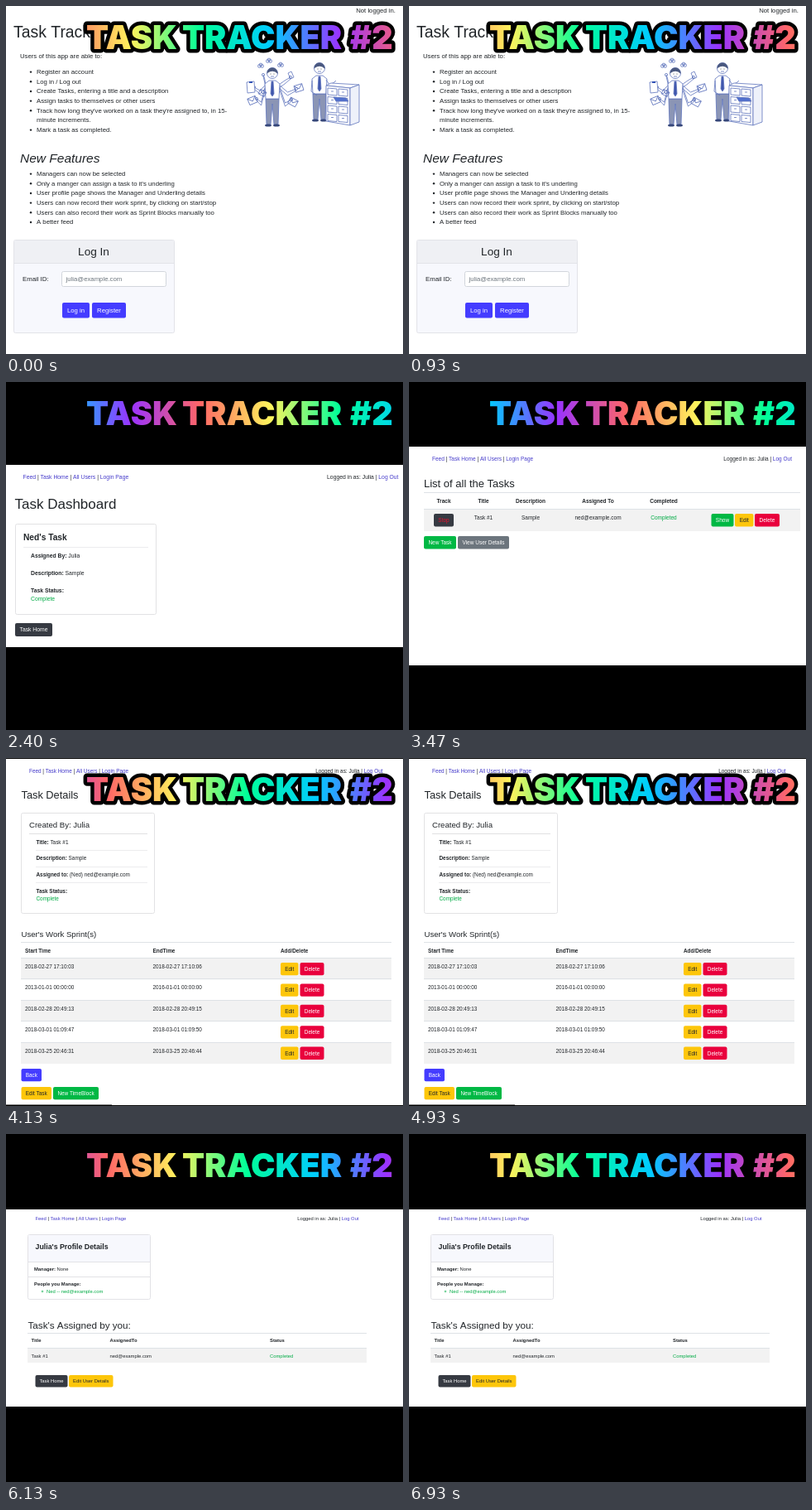
These frames come from a looping animation (480 by 420 pixels, 6990 ms). An HTML page with a canvas:

```html
<!DOCTYPE html>
<html lang="en">
<head>
<meta charset="utf-8">
<title>Task Tracker</title>
<style>
html, body { margin: 0; width: 100%; height: 100%; overflow: hidden; background: #000; }
canvas { display: block; width: 480px; height: 420px; }
</style>
</head>
<body>
<canvas id="stage" width="480" height="420"></canvas>
<script>
const g = document.getElementById('stage').getContext('2d');
const LOOP = 6990, FRAMES = 105, PER_PAGE = 15;
const SANS = '"Liberation Sans", Arial, sans-serif';
const INK = '#212529', LINK = '#463ccb', GREEN = '#00ab45', GREY = '#dee2e6';
const FILL = { blue: '#443cff', dark: '#363a42', green: '#00b844', yellow: '#fdc60a', red: '#e9003d', grey: '#6c757d' };
const USER = 'Julia', MATE = 'Ned', USER_MAIL = 'julia@example.com', MATE_MAIL = 'ned@example.com';

let size = 7.75; // body text size of the current page

function text(str, x, y, o = {}) {
  g.font = `${o.style || ''} ${o.size || size}px ${SANS}`;
  g.textAlign = o.align || 'left';
  g.fillStyle = o.color || INK;
  g.fillText(str, x, y);
  return x + g.measureText(str).width;
}
const bold = (str, x, y, o = {}) => text(str, x, y, { ...o, style: 'bold' });
const field = (label, value, x, y) => text(' ' + value, bold(label, x, y), y);

function rect(x, y, x2, y2, color) {
  g.fillStyle = color;
  g.fillRect(x, y, x2 - x, y2 - y);
}
const rule = (x, x2, y, color = GREY) => rect(x, y, x2, y + 1, color);

function box(x, y, x2, y2, fill, border, r = 2) {
  g.beginPath();
  g.roundRect(x, y, x2 - x, y2 - y, r);
  g.fillStyle = fill;
  g.fill();
  if (border) {
    g.strokeStyle = border;
    g.lineWidth = 1;
    g.stroke();
  }
}

function button(label, x, x2, y, h, kind, color) {
  box(x, y, x2, y + h, FILL[kind]);
  text(label, (x + x2) / 2, y + h / 2 + size * 0.36,
    { align: 'center', color: color || (kind === 'yellow' ? INK : '#fff') });
}

function dot(x, y, r, fill) {
  g.beginPath();
  g.arc(x, y, r, 0, 7);
  if (fill) { g.fillStyle = fill; g.fill(); } else g.stroke();
}

function runs(parts, x, y) {
  parts.forEach(([s, c]) => { x = text(s, x, y, { color: c }); });
}

function nav(left, right, y) {
  const links = ['Feed', 'Task Home', 'All Users', 'Login Page'];
  runs(links.flatMap((s, i) => i ? [[' | ', INK], [s, LINK]] : [[s, LINK]]), left, y);
  const who = `Logged in as: ${USER} | `, out = 'Log Out';
  g.font = `${size}px ${SANS}`;
  runs([[who, INK], [out, LINK]], right - g.measureText(who + out).width, y);
}

function sheet(top, bottom, textSize) {
  rect(0, top, 480, bottom, '#fff');
  size = textSize;
}

function line(pts, fill) {
  g.beginPath();
  pts.forEach(([x, y], i) => i ? g.lineTo(x, y) : g.moveTo(x, y));
  if (fill) { g.closePath(); g.fillStyle = fill; g.fill(); }
  g.stroke();
}

function worker(x, y) {
  // x, y: centre of the head
  line([[x - 8, y + 31], [x + 8, y + 31], [x + 7, y + 62], [x + 2, y + 62], [x, y + 37], [x - 2, y + 62], [x - 7, y + 62]], '#8b95b5');
  line([[x - 4, y + 9], [x + 4, y + 9], [x + 9, y + 13], [x + 8, y + 31], [x - 8, y + 31], [x - 9, y + 13]], '#fff');
  line([[x - 1, y + 10], [x + 1, y + 10], [x + 2, y + 25], [x, y + 28], [x - 2, y + 25]], '#4057ad');
  for (const s of [-5, 5]) {
    g.beginPath();
    g.ellipse(x + s, y + 63, 4, 1.6, 0, 0, 7);
    g.fillStyle = '#354679';
    g.fill();
  }
  dot(x, y, 6.5, '#fff');
  dot(x, y, 6.5);
  g.beginPath();
  g.arc(x, y, 6.5, 3, 6.4);
  g.quadraticCurveTo(x + 1, y - 5, x - 6, y);
  g.fillStyle = '#49587f';
  g.fill();
  dot(x - 2, y + 1, 0.5, INK);
  dot(x + 2, y + 1, 0.5, INK);
  line([[x - 2, y + 4], [x + 2, y + 4]]);
}

function letter(x, y, w, h, tilt) {
  g.save();
  g.translate(x, y);
  g.rotate(tilt);
  line([[-w, -h], [w, -h], [w, h], [-w, h], [-w, -h], [0, h / 4], [w, -h]]);
  g.restore();
}

function drawing() {
  g.strokeStyle = '#6075bd';
  g.lineWidth = 0.8;
  for (const [x, y] of [[318, 66], [308, 72], [332, 71]])
    for (const [dx, dy] of [[-1.6, 0.5], [1.6, 0.5], [0, -1]]) dot(x + dx, y + dy, 1.9);
  const hands = [[300, 98], [344, 86], [351, 100], [345, 113], [303, 112], [311, 83]];
  hands.forEach(([x, y]) => {
    const s = x < 322 ? -1 : 1;
    line([[322 + s * 8, 95], [(x + 322) / 2 + s * 4, y + 4], [x, y]]);
    line([[322 + s * 8, 99], [(x + 322) / 2 + s * 4, y + 8], [x, y + 2]]);
    dot(x, y, 1.6);
  });
  worker(322, 81);
  rect(291, 93, 301, 104, '#fff');
  line([[291, 92], [300, 91], [301, 104], [292, 105], [291, 92]]);
  rect(294, 91, 298, 93, '#3151b5');
  letter(354, 99, 5, 4, -0.3);
  letter(347, 116, 5, 4, 0.5);
  letter(298, 114, 5, 4, -0.4);
  letter(310, 105, 4, 3, 0.5);
  line([[341, 81], [345, 79], [348, 86], [344, 88], [341, 81]]);
  worker(379, 75);
  line([[387, 89], [391, 95], [397, 92], [399, 90]]);
  line([[370, 90], [369, 103], [376, 108]]);
  line([[387, 96], [393, 93], [427, 95], [416, 99], [387, 96]], '#fff');
  line([[387, 96], [416, 99], [416, 144], [387, 139]], '#fff');
  line([[416, 99], [427, 95], [427, 140], [416, 144]], '#eef1fa');
  for (let r = 0; r < 4; r++)
    for (let c = 0; c < 2; c++) {
      const x = 389 + c * 13, y = 99 + r * 10.5 + c;
      line([[x, y], [x + 11, y + 1], [x + 11, y + 9], [x, y + 8], [x, y]]);
      line([[x + 4, y + 4], [x + 7, y + 4]]);
    }
  line([[396, 110], [411, 111], [414, 115], [399, 115]], '#5271ce');
}

function bullets(items, y) {
  items.forEach((s, i) => {
    const base = y + i * 11.67;
    if (s[0] !== '~') dot(30, base - 2.4, 1.2, INK);
    text(s.replace('~', ''), 37, base);
  });
}

function login() {
  sheet(0, 420, 7.75);
  text('Not logged in.', 471, 8.3, { align: 'right' });
  text('Task Tracker', 9, 38, { size: 19.4 });
  text('Users of this app are able to:', 17, 62.6);
  bullets(['Register an account', 'Log in / Log out',
    'Create Tasks, entering a title and a description',
    'Assign tasks to themselves or other users',
    "Track how long they've worked on a task they're assigned to, in 15-",
    '~minute increments.', 'Mark a task as completed.'], 82);
  text('New Features', 17, 189, { size: 15.5, style: 'italic' });
  bullets(['Managers can now be selected',
    "Only a manger can assign a task to it's underling",
    'User profile page shows the Manager and Underling details',
    'Users can now record their work sprint, by clicking on start/stop',
    'Users can also record their work as Sprint Blocks manually too',
    'A better feed'], 205);
  drawing();
  box(9.5, 282.5, 203.5, 394.5, '#f7f8fd', '#e2e3e8');
  rect(10, 283, 203, 310, '#eff0f4');
  rule(10, 203, 310, '#e2e3e8');
  text('Log In', 106, 301, { size: 13.6, align: 'center' });
  text('Email ID:', 20, 332);
  box(67.5, 320.5, 193.5, 338.5, '#fff', '#d2d6dc');
  text(USER_MAIL, 72.5, 332, { color: '#6c757d' });
  button('Log in', 68, 101, 358, 18.5, 'blue');
  button('Register', 104, 145, 358, 18.5, 'blue');
}

function dashboard() {
  sheet(100, 320, 6.8);
  nav(20.5, 474.5, 117);
  text('Task Dashboard', 10.5, 153, { size: 17 });
  box(11.5, 171.5, 181.5, 280.5, '#fff', '#e2e2e4');
  bold(MATE + "'s Task", 21, 191, { size: 10.2 });
  rule(21, 172, 199, '#ececee');
  field('Assigned By:', USER, 30, 212);
  field('Description:', 'Sample', 30, 233);
  bold('Task Status:', 30, 254);
  text('Complete', 30, 263.5, { color: GREEN });
  button('Task Home', 11, 56, 291, 16, 'dark');
}

function taskList() {
  sheet(78, 342, 6.5);
  nav(28, 463, 95);
  text('List of all the Tasks', 18, 126.5, { size: 13 });
  rule(18, 473, 133);
  rect(18, 153, 473, 180, '#f2f2f2');
  rule(18, 473, 153);
  const cols = [42, 90, 147, 228.5, 308];
  ['Track', 'Title', 'Description', 'Assigned To', 'Completed'].forEach((s, i) =>
    bold(s, cols[i], 145.5, { align: 'center' }));
  ['', 'Task #1', 'Sample', MATE_MAIL, 'Completed'].forEach((s, i) =>
    text(s, cols[i], 166, { align: 'center', color: i === 4 ? GREEN : INK }));
  button('Stop', 30, 54, 159, 15.5, 'dark', '#e5122f');
  button('Show', 365.5, 392.5, 159, 15.5, 'green');
  button('Edit', 394, 416.5, 159, 15.5, 'yellow');
  button('Delete', 418, 448, 159, 15.5, 'red');
  button('New Task', 18, 57, 186, 15.5, 'green');
  button('View User Details', 59, 121, 186, 15.5, 'grey');
}

function details() {
  sheet(1, 419, 6.4);
  nav(28, 455.5, 18);
  text('Task Details', 18.5, 49, { size: 12.8 });
  box(18.5, 66.5, 179.5, 187.5, '#fff', '#e2e2e4');
  text('Created By: ' + USER, 28, 84, { size: 9.6 });
  rule(28, 171, 91, '#e0e0e2');
  [111, 131, 150].forEach(y => rule(36, 171, y, '#ececee'));
  field('Title:', 'Task #1', 36.5, 103.5);
  field('Description:', 'Sample', 36.5, 123);
  field('Assigned to:', `(${MATE}) ${MATE_MAIL}`, 36.5, 143);
  bold('Task Status:', 36.5, 162.7);
  text('Complete', 36.5, 172, { color: GREEN });
  text("User's Work Sprint(s)", 18.5, 216, { size: 9.6 });
  rule(18, 466, 222);
  bold('Start Time', 23, 234.5);
  bold('EndTime', 177.5, 234.5);
  bold('Add/Delete', 332, 234.5);
  [['2018-02-27 17:10:03', '2018-02-27 17:10:06'],
   ['2013-01-01 00:00:00', '2016-01-01 00:00:00'],
   ['2018-02-28 20:49:13', '2018-02-28 20:49:15'],
   ['2018-03-01 01:09:47', '2018-03-01 01:09:50'],
   ['2018-03-25 20:46:31', '2018-03-25 20:46:44']].forEach(([from, to], i) => {
    const y = 242 + i * 25.4;
    if (i % 2 === 0) rect(18, y, 466, y + 25.4, '#f2f2f2');
    rule(18, 466, Math.round(y) - 1);
    text(from, 23, y + 12);
    text(to, 177.5, y + 12);
    button('Edit', 332, 353.5, y + 5, 15.3, 'yellow');
    button('Delete', 355.5, 384.5, y + 5, 15.3, 'red');
  });
  button('Back', 18.5, 43, 375, 15.3, 'blue');
  button('Edit Task', 18.5, 55, 397, 15.3, 'yellow');
  button('New TimeBlock', 57, 112, 397, 15.3, 'green');
  rule(0, 128, 418, '#777');
}

function profile() {
  sheet(91, 329, 5.85);
  nav(35.5, 426.5, 104);
  box(26.5, 121.5, 174.5, 199.5, '#fff', '#e2e2e6');
  rect(27, 122, 174, 154, '#f7f8fd');
  rule(27, 174, 154, '#e2e2e6');
  bold(USER + "'s Profile Details", 35.5, 138.5, { size: 8.8 });
  field('Manager:', 'None', 34, 165);
  rule(27, 174, 172, '#e2e2e6');
  bold('People you Manage:', 34, 183);
  g.strokeStyle = GREEN;
  g.lineWidth = 0.6;
  dot(44, 190, 0.9);
  text(`${MATE} -- ${MATE_MAIL}`, 49, 192, { color: GREEN });
  text("Task's Assigned by you:", 26.5, 234.5, { size: 11.7 });
  rule(26, 436, 240);
  rect(26, 258, 436, 276, '#f2f2f2');
  rule(26, 436, 258);
  const cols = [30.5, 125.5, 319];
  ['Title', 'AssignedTo', 'Status'].forEach((s, i) => bold(s, cols[i], 251.3));
  ['Task #1', MATE_MAIL, 'Completed'].forEach((s, i) =>
    text(s, cols[i], 269.8, { color: i === 2 ? GREEN : INK }));
  button('Task Home', 35.5, 74.5, 291, 14.5, 'dark');
  button('Edit User Details', 76, 129.5, 291, 14.5, 'yellow');
}

function plain(top, bottom) {
  sheet(top, bottom, 6.5);
  nav(28, 463, top + 17);
}

const PAGES = [login, () => plain(83, 337), dashboard, taskList, details, () => plain(79, 341), profile];

const HUES = ['#ff6666', '#fff35c', '#00ff99', '#00ccff', '#9933ff'];
const WORDS = [['TASK', 97], ['TRACKER', 213], ['#2', 416]];
const BAND = 420; // width of one full rainbow

function banner(step) {
  const red = 67 + step * BAND / PER_PAGE;
  const rainbow = g.createLinearGradient(red - BAND, 0, red + BAND, 0);
  for (let i = 0; i <= 10; i++) rainbow.addColorStop(i / 10, HUES[i % 5]);
  g.font = '900 39.5px Inter, "Open Sans", sans-serif';
  g.textAlign = 'left';
  g.lineJoin = 'round';
  g.lineWidth = 9;
  g.strokeStyle = '#000';
  WORDS.forEach(([s, x]) => g.strokeText(s, x, 52));
  g.fillStyle = rainbow;
  WORDS.forEach(([s, x]) => g.fillText(s, x, 52));
}

function draw(now) {
  const frame = Math.floor((now % LOOP + 5) / LOOP * FRAMES) % FRAMES;
  rect(0, 0, 480, 420, '#000');
  PAGES[Math.floor(frame / PER_PAGE)]();
  banner(frame % PER_PAGE);
}

const start = performance.now();
function tick() {
  draw(performance.now() - start);
  requestAnimationFrame(tick);
}
tick();
</script>
</body>
</html>
```
